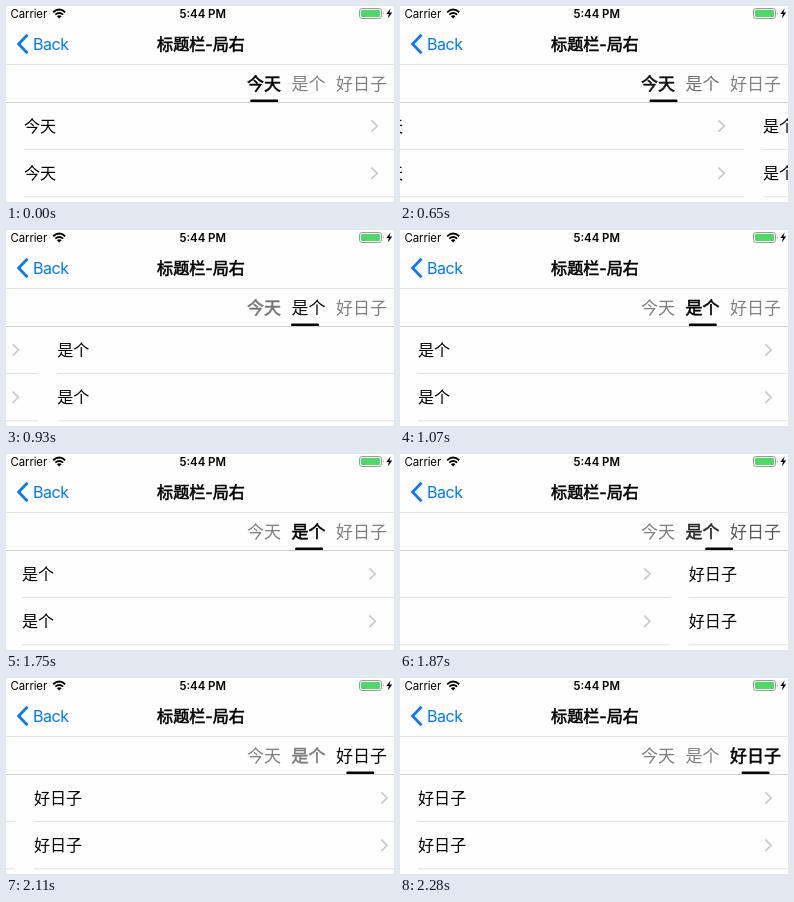
An HTML page for the animation above (3.06 s loop, 388 by 196 pixels).

```html
<!DOCTYPE html>
<html lang="zh-CN">
<head>
<meta charset="utf-8">
<title>标题栏</title>
<style>
  html, body { margin: 0; width: 100%; height: 100%; overflow: hidden; background: #fefefe; }
  svg { display: block; width: 388px; height: 196px; }
  text { font-family: Inter, "Noto Sans CJK SC", "Noto Sans CJK", sans-serif; font-size: 16.1px; }
  .status { font-size: 11.4px; }
  .time { font-weight: 600; }
  .semibold { stroke: currentColor; stroke-width: .55; }
  .tab { font-size: 17px; fill: currentColor; }
  .chevron { fill: none; stroke: #c9c9cc; stroke-width: 1.7; }
</style>
</head>
<body>
<svg viewBox="0 0 388 196">
  <g>
    <text class="status" x="4.5" y="12" letter-spacing="-.1">Carrier</text>
    <g fill="none" stroke="#000" stroke-width="1.9">
      <path d="M47.2 6.2Q53.2 .9 59.2 6.2M49.3 8.6Q53.2 5.2 57.1 8.6"/>
    </g>
    <path d="M53.2 12.6l-2.3-2.4q2.3-1.8 4.6 0z"/>
    <text class="status time" x="196.7" y="12" text-anchor="middle">5:44 PM</text>
    <rect x="353.5" y="2.5" width="22" height="10" rx="2.6" fill="#fff" stroke="#999"/>
    <rect x="355" y="4" width="19" height="7" rx="1.3" fill="#4cd964"/>
    <path d="M377 5.8q1.6 1.7 0 3.4z" fill="#999"/>
    <path d="M384.6 2.4l-4.3 5.7h2.6l-1.1 4.4 4.4-5.9h-2.7z"/>
  </g>

  <path d="M21.5 28.8L12.6 38L21.5 47.2" fill="none" stroke="#007aff" stroke-width="2.7"/>
  <text x="27" y="43.5" fill="#007aff" letter-spacing="-.5">Back</text>
  <text class="semibold" x="195" y="43.6" text-anchor="middle">标题栏-局右</text>
  <path d="M0 58.5H388" stroke="#e2e2e2"/>

  <g id="tabs"></g>
  <rect id="bar" y="93.5" width="28" height="2.8" rx="1.2"/>
  <path d="M0 96.5H388" stroke="#cfcfcf"/>
  <g id="pages"></g>
</svg>
<script>
const LOOP = 3060, PAGE = 392, DECAY = 0.018;
const tabs = [
  { label: '今天', x: 241, center: 258.2 },
  { label: '是个', x: 285.6, center: 302.8 },
  { label: '好日子', x: 330, center: 355.6 }
];
// A swipe follows the finger until release, then coasts to the next page.
const swipes = [
  { steps: [650, 710, 740, 780, 820, 850, 890, 940, 980, 1020], end: 1070,
    begin: 47, release: 820, reached: 275, power: 1.1 },
  { steps: [1750, 1810, 1870, 1930, 1990, 2050, 2110, 2170, 2220], end: 2280,
    begin: 2, release: 1990, reached: 306, power: 1.35 }
];

const byId = id => document.getElementById(id);
const row = (label, y) => `
  <text x="18" y="${y + 6}">${label}</text>
  <path class="chevron" d="M365.4 ${y - 5.6}l5.8 5.6l-5.8 5.6"/>
  <path d="M18 ${y + 23.5}H391" stroke="#e2e2e4"/>`;

byId('tabs').innerHTML = tabs.map(t =>
  `<text class="tab" x="${t.x}" y="83.6">${t.label}</text>`).join('');
byId('pages').innerHTML = tabs.map((t, i) =>
  `<g transform="translate(${i * PAGE})">${row(t.label, 120)}${row(t.label, 167.3)}</g>`).join('');
const labels = [...byId('tabs').children];

function travel(swipe, time) {
  const { steps, begin, release, reached, power } = swipe;
  const t = steps.filter(s => s <= time).pop();
  if (t >= release) return PAGE - (PAGE - reached) * Math.exp(-DECAY * (t - release));
  const u = (t - steps[0]) / (release - steps[0]);
  return begin + (reached - begin) * u ** power;
}

function draw(time) {
  const page = swipes.filter(s => time >= s.end).length;
  const swipe = swipes[page];
  const moving = swipe && time >= swipe.steps[0];
  const part = moving ? travel(swipe, time) / PAGE : 0;
  const position = page + part;
  const next = tabs[Math.min(page + 1, tabs.length - 1)];
  const center = tabs[page].center + (next.center - tabs[page].center) * part;

  byId('pages').setAttribute('transform', `translate(${-position * PAGE})`);
  byId('bar').setAttribute('x', center - 14);
  labels.forEach((label, i) => {
    const shade = Math.round(128 * Math.min(1, Math.abs(i - position)));
    label.style.color = `rgb(${shade},${shade},${shade})`;
    label.classList.toggle('semibold', i === page);
  });
}

const start = performance.now();
function tick() {
  draw((performance.now() - start) % LOOP);
  requestAnimationFrame(tick);
}
tick();
</script>
</body>
</html>
```
